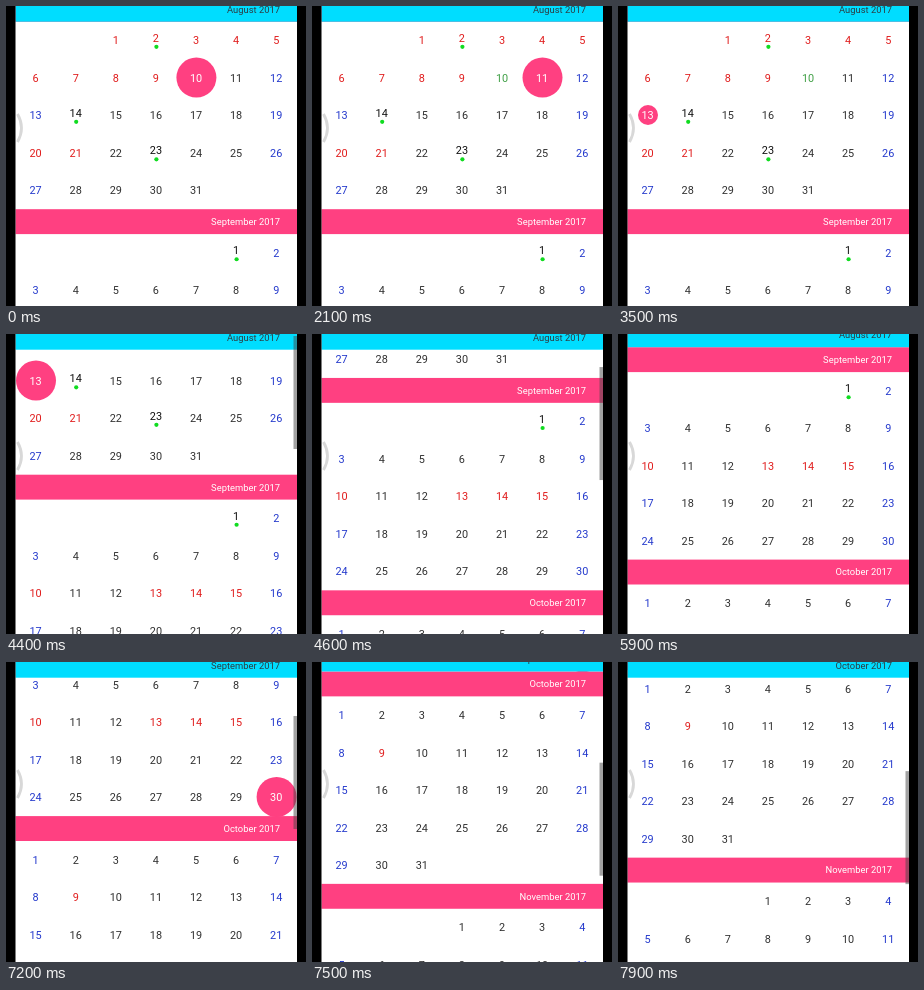
An HTML page with a canvas for the animation above (8 s loop, 300 by 300 pixels).

```html
<!DOCTYPE html>
<html lang="en">
<head>
<meta charset="utf-8">
<title>Calendar</title>
<style>
html, body { margin: 0; width: 100%; height: 100%; overflow: hidden; background: #000; }
canvas { display: block; width: 300px; height: 300px; }
</style>
</head>
<body>
<canvas id="stage"></canvas>
<script>
const SIZE = 300, LOOP = 8000, STEP = 100;
const LEFT = 9.5, RIGHT = 291;
const ROW = 37.5, HEAD = 24.9, TOP = -9.2;
const FONT = 'Roboto, "Open Sans", sans-serif';
const PINK = '#ff4081', CYAN = '#00ddff';
const RED = '#e01c1c', BLUE = '#2439cc', DARK = '#303030', GREEN = '#3f9f45';

const months = [
  { name: 'August 2017', first: 2, days: 31, red: [1, 2, 3, 4, 5, 6, 7, 8, 9, 20, 21], events: [2, 14, 23], today: 10 },
  { name: 'September 2017', first: 5, days: 30, red: [10, 13, 14, 15], events: [1] },
  { name: 'October 2017', first: 0, days: 31, red: [9], events: [] },
  { name: 'November 2017', first: 3, days: 30, red: [], events: [] }
];
let offset = TOP;
for (const m of months) {
  m.top = offset;
  offset += HEAD + Math.ceil((m.first + m.days) / 7) * ROW;
}

// Each tap selects one day: time, month index, day
const taps = [
  { at: -1000, month: 0, day: 10 },
  { at: 1700, month: 0, day: 11 },
  { at: 2900, month: 0, day: 16 },
  { at: 3500, month: 0, day: 13 },
  { at: 6700, month: 1, day: 30 }
];

const canvas = document.getElementById('stage');
const ctx = canvas.getContext('2d');
const dpr = window.devicePixelRatio || 1;
canvas.width = canvas.height = SIZE * dpr;
ctx.scale(dpr, dpr);

const clamp = v => Math.max(0, Math.min(1, v));

// A short drag, then a fling that dies away exponentially
function scrollAt(t) {
  if (t < 4400) return 0;
  if (t < 5300) return 190 - 127.5 * Math.pow(0.491, (t - 4400) / 100);
  if (t < 7200) return 190;
  return 435 - 173.5 * Math.pow(0.55, (t - 7200) / 100);
}

function barAlpha(t) {
  if (t < 4400) return 0;
  if (t >= 7200) return 1;
  return 1 - clamp((t - 5400) / 300);
}

function barTop(s) {
  const pts = [[0, -18], [62.5, 2], [159, 33], [261.5, 54], [435, 110]];
  let i = 1;
  while (i < pts.length - 1 && s > pts[i][0]) i++;
  const [x0, y0] = pts[i - 1], [x1, y1] = pts[i];
  return y0 + (y1 - y0) * (s - x0) / (x1 - x0);
}

function dot(x, y, r, color) {
  ctx.fillStyle = color;
  ctx.beginPath();
  ctx.arc(x, y, r, 0, Math.PI * 2);
  ctx.fill();
}

function header(name, y, fill, color) {
  ctx.fillStyle = fill;
  ctx.fillRect(LEFT, y, RIGHT - LEFT, HEAD);
  ctx.fillStyle = color;
  ctx.font = '9.4px ' + FONT;
  ctx.textAlign = 'right';
  ctx.fillText(name, 274, y + HEAD / 2 + 3.4);
}

function dayColor(m, day, col) {
  if (day === m.today) return GREEN;
  if (m.red.includes(day)) return RED;
  if (col === 0 || col === 6) return BLUE;
  return m.events.includes(day) ? '#101010' : DARK;
}

function drawDays(m, y, picked, grow) {
  for (let day = 1; day <= m.days; day++) {
    const cell = m.first + day - 1;
    const col = cell % 7;
    const x = 29.6 + col * 40.1;
    const cy = y + HEAD + ROW * (Math.floor(cell / 7) + 0.5);
    if (cy < -25 || cy > SIZE + 25) continue;
    const selected = day === picked;
    const event = m.events.includes(day);
    if (selected) dot(x + 0.4, cy - 0.4, 20 * grow, PINK);
    ctx.font = '10.9px ' + FONT;
    ctx.textAlign = 'center';
    ctx.fillStyle = selected ? '#fff' : dayColor(m, day, col);
    ctx.fillText(day, x, cy + (event ? 1.4 : 3.9));
    if (event) dot(x + 0.5, cy + 6.4, 2.1, '#10dc20');
  }
}

function draw(t) {
  const s = scrollAt(t);
  const tap = taps.filter(p => p.at <= t).pop();
  const grow = clamp((t - tap.at + 100) / 200);

  ctx.fillStyle = '#fff';
  ctx.fillRect(0, 0, SIZE, SIZE);

  months.forEach((m, i) => {
    const y = m.top - s;
    drawDays(m, y, tap.month === i ? tap.day : 0, grow);
    header(m.name, y, PINK, '#fff');
  });

  // Pinned header, pushed up by the next month
  const index = months.filter(m => m.top - s <= TOP).length - 1;
  const next = months[index + 1];
  const pinY = next ? Math.min(TOP, next.top - s - HEAD) : TOP;
  header(months[index].name, pinY, CYAN, '#2c3c42');

  ctx.fillStyle = `rgba(70,70,70,${0.5 * barAlpha(t)})`;
  ctx.fillRect(287.5, barTop(s), 3.5, 113);

  ctx.strokeStyle = '#d8d8d8';
  ctx.lineWidth = 2.8;
  ctx.beginPath();
  ctx.moveTo(11.5, 108);
  ctx.quadraticCurveTo(19.5, 122, 11.5, 136);
  ctx.stroke();

  ctx.fillStyle = '#000';
  ctx.fillRect(0, 0, LEFT, SIZE);
  ctx.fillRect(RIGHT, 0, SIZE - RIGHT, SIZE);
}

const start = performance.now();
function tick() {
  const t = (performance.now() - start) % LOOP;
  draw(Math.floor(t / STEP) * STEP);
  requestAnimationFrame(tick);
}
tick();
</script>
</body>
</html>
```
